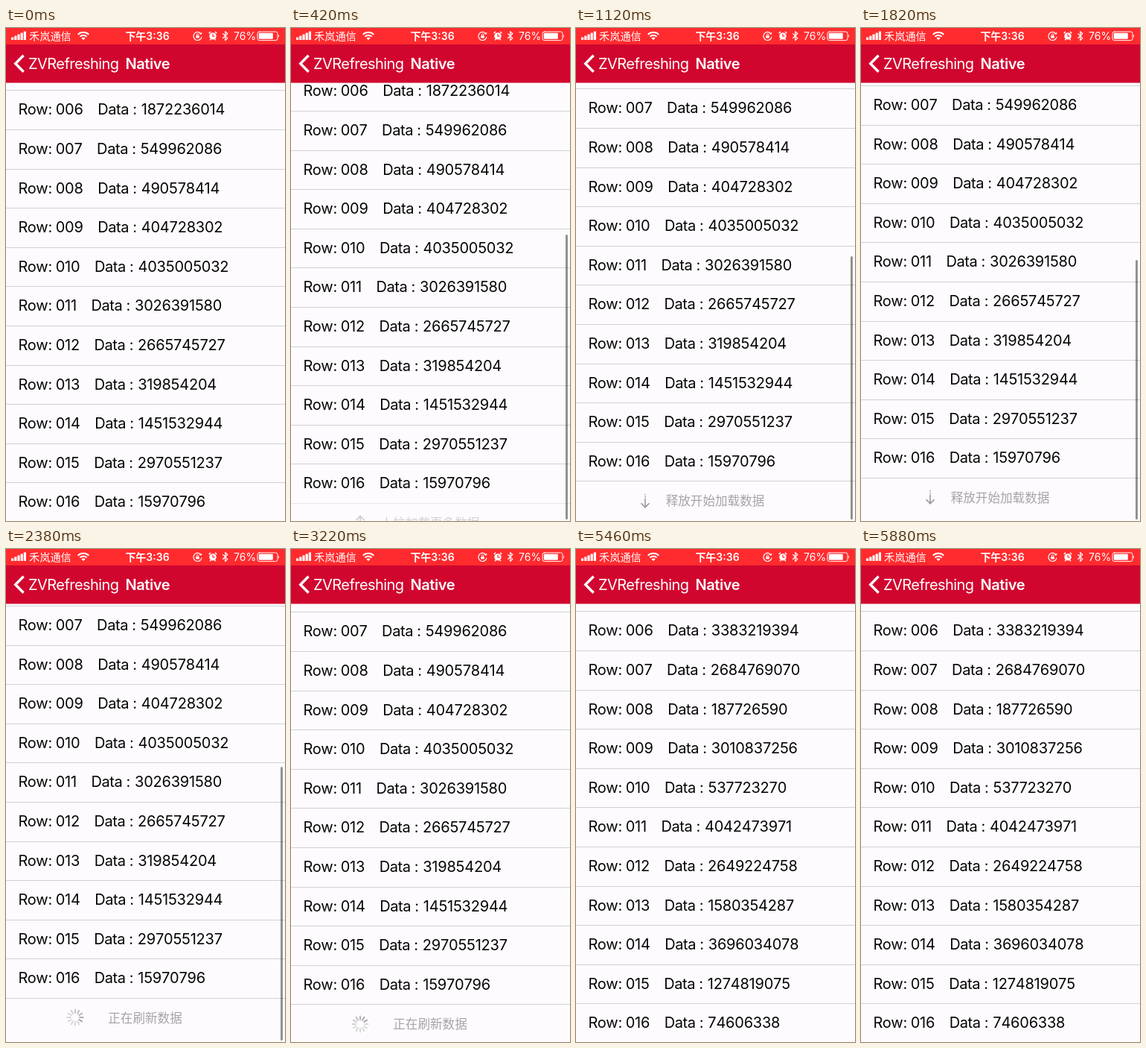
An HTML page for the animation above (6020 ms loop, 375 by 661 pixels).

```html
<!DOCTYPE html>
<html lang="zh-CN">
<head>
<meta charset="utf-8">
<title>Pull to load more</title>
<style>
html, body { margin: 0; width: 100%; height: 100%; overflow: hidden; background: #fdfbfd; }
#stage { position: relative; width: 375px; height: 661px; overflow: hidden; background: #fdfbfd; }
#list { position: absolute; left: 0; top: 0; width: 375px; }
.row, #footer {
  position: absolute; left: 0; width: 375px; height: 52.6px;
  box-sizing: border-box; border-top: 1px solid #d2d0d3;
}
.row {
  font: 20px/51.6px Inter, "Noto Sans", sans-serif; font-kerning: none;
  letter-spacing: -.22px; color: #060506; white-space: pre;
}
.row b { position: absolute; left: 16.5px; font-weight: 400; font-kerning: normal; }
.row .num { margin-left: 66.7px; }
.row .key {
  display: inline-block; width: 58.6px; margin-left: 19.5px;
  font-kerning: normal; letter-spacing: -.4px;
}
#hint {
  position: absolute; left: -.5px; top: -.2px; width: 375px; text-align: center;
  font: 16.6px/51.6px "Noto Sans CJK SC", "Noto Sans CJK", sans-serif; color: #a5a3a6;
}
#footer svg { position: absolute; left: 78px; top: 10.6px; }
#thumb { position: absolute; left: 368.7px; width: 3px; border-radius: 1.5px; background: rgba(0,0,0,.42); }
#bar { position: absolute; left: 0; top: 0; }
</style>
</head>
<body>
<div id="stage">
  <div id="list">
    <div id="footer">
      <svg width="30" height="30" viewBox="-15 -15 30 30" fill="none" stroke-linecap="round">
        <g id="arrow" stroke="#a09ea1" stroke-width="1.7">
          <path d="M0 8.5V-3M-5 3.7L0 8.7L5 3.7M0 -5.7v.3M0 -8.6v.2"/>
        </g>
        <g id="spinner" stroke="#858386" stroke-width="2"></g>
      </svg>
      <div id="hint"></div>
    </div>
  </div>
  <div id="thumb"></div>
  <svg id="bar" width="375" height="74" fill="none" stroke-linecap="round" stroke-linejoin="round">
    <rect width="375" height="73.5" fill="#d1062f"/>
    <rect width="375" height="22" fill="#ff2b2e"/>
    <g fill="#fff">
      <path d="M7 12.5h3.2v3.5H7zM11.2 10.5h3.2V16h-3.2zM15.4 8.5h3.2V16h-3.2zM19.6 6.5h3.2V16h-3.2zM23.8 4.5H27V16h-3.2z"/>
      <text x="31" y="15.7" font-size="14.2" font-family="'Noto Sans CJK SC', 'Noto Sans CJK', sans-serif">禾岚通信</text>
      <text x="190" y="15.6" font-size="14" font-weight="600" text-anchor="middle" font-family="Inter, 'Noto Sans CJK SC', sans-serif">下午3:36</text>
      <text x="306" y="15.6" font-size="14" font-family="Inter, sans-serif">76%</text>
      <path d="M104 16.3l-2.6-2.7a3.8 3.8 0 0 1 5.2 0z"/>
      <circle cx="278" cy="10.9" r="4.7"/>
      <rect x="255.2" y="10.2" width="4.6" height="3.2" rx=".5"/>
      <rect x="339.8" y="6.8" width="19" height="8" rx="1"/>
      <path d="M366.2 8.8q2 2 0 4z"/>
    </g>
    <g stroke="#fff" stroke-width="1.2">
      <path stroke-width="1.9" stroke-linecap="butt" d="M99.4 11.6a6.5 6.5 0 0 1 9.2 0M96.7 8.8a10.3 10.3 0 0 1 14.6 0"/>
      <path d="M262 7.8a5.5 5.5 0 1 0 .9 4.2M262.9 6.6l-.8 1.6l-1.7-.5"/>
      <path stroke-width=".9" d="M256.3 10.2v-1.2a1.2 1.2 0 0 1 2.4 0v1.2"/>
      <path stroke-width="1.5" d="M273.2 6.6l1.4-1.3M282.8 6.6l-1.4-1.3M275 15.2l-.5.6M281 15.2l.5.6"/>
      <path d="M291.6 7.6l6.2 6l-3.1 2.9V4.6l3.1 2.9l-6.2 6"/>
      <rect x="338" y="5" width="27" height="11.6" rx="2.4" stroke-width="1"/>
      <path stroke="#ff2b2e" d="M278 8.2v2.9h2.2"/>
      <path stroke-width="3.4" stroke-linecap="butt" stroke-linejoin="miter" d="M23.6 36.8L12.7 47.8L23.6 58.8"/>
    </g>
    <g fill="#fff" font-family="Inter, sans-serif" font-size="20" letter-spacing="-.55">
      <text x="30" y="54.9">ZVRefreshing</text>
      <text x="160.6" y="54.9" font-weight="600" letter-spacing="-.45">Native</text>
    </g>
  </svg>
</div>
<script>
const LOOP = 6020, STEP = 140, PITCH = 52.6, TOP = 83.3, FIRST = 6;
const RELEASE = 2240, DONE = 5320, THRESHOLD = 51.6;
const before = '1872236014 549962086 490578414 404728302 4035005032 3026391580 2665745727 319854204 1451532944 2970551237 15970796'.split(' ');
const after = '3383219394 2684769070 187726590 3010837256 537723270 4042473971 2649224758 1580354287 3696034078 1274819075 74606338'.split(' ');

// [time, distance pulled past the end]
const pull = [[0, 0], [140, 6], [420, 25], [700, 39], [1120, 54.5], [1400, 59],
  [1820, 59], [2240, 64], [2380, 60], [2520, 52.5], [2660, THRESHOLD]];

const $ = id => document.getElementById(id);
const list = $('list'), footer = $('footer'), hint = $('hint'), thumb = $('thumb');
const arrow = $('arrow'), spinner = $('spinner');

const values = before.map((v, i) => {
  const row = document.createElement('div');
  row.className = 'row';
  row.style.top = TOP + i * PITCH + 'px';
  const num = String(FIRST + i).padStart(3, '0');
  row.innerHTML = `<b>Row:</b><span class="num">${num}</span><span class="key">Data :</span><span></span>`;
  list.append(row);
  return row.lastChild;
});
footer.style.top = TOP + before.length * PITCH + 'px';

for (let i = 0; i < 12; i++) {
  const spoke = document.createElementNS('http://www.w3.org/2000/svg', 'path');
  spoke.setAttribute('d', 'M0 -6V-10.6');
  spoke.setAttribute('transform', `rotate(${i * 30})`);
  spinner.append(spoke);
}

function at(keys, t) {
  const i = keys.findIndex(k => k[0] > t);
  if (i < 0) return keys[keys.length - 1][1];
  const [t0, a] = keys[i - 1], [t1, b] = keys[i];
  return a + (b - a) * (t - t0) / (t1 - t0);
}

function draw(t) {
  const done = t >= DONE;
  const loading = t > RELEASE && !done;
  const over = done ? 0 : at(pull, t);
  const armed = over > THRESHOLD;

  list.style.top = -over + 'px';
  const data = done ? after : before;
  values.forEach((el, i) => { el.textContent = data[i]; });

  footer.style.visibility = over ? 'visible' : 'hidden';
  footer.style.opacity = loading ? 1 : Math.min(1, over / THRESHOLD);
  hint.textContent = loading ? '正在刷新数据' : armed ? '释放开始加载数据' : '上拉加载更多数据';
  arrow.style.display = loading ? 'none' : '';
  arrow.setAttribute('transform', `rotate(${armed ? 0 : 180})`);
  spinner.style.display = loading ? '' : 'none';
  const head = Math.floor(t * 12 / 1000);
  [...spinner.children].forEach((s, i) => {
    const age = (head - i + 1200) % 12;
    s.style.opacity = Math.max(.3, .72 - age * .07);
  });

  const y = loading ? 283.5 + over - THRESHOLD : 251.5 + over;
  thumb.style.top = y + 'px';
  thumb.style.height = 659 - y + 'px';
  thumb.style.opacity = t < STEP ? 0 : Math.max(0, Math.min(1, (3150 - t) / 280));
}

const start = performance.now();
function tick() {
  const t = (performance.now() - start) % LOOP;
  draw(Math.floor(t / STEP) * STEP);
  requestAnimationFrame(tick);
}
tick();
</script>
</body>
</html>
```
